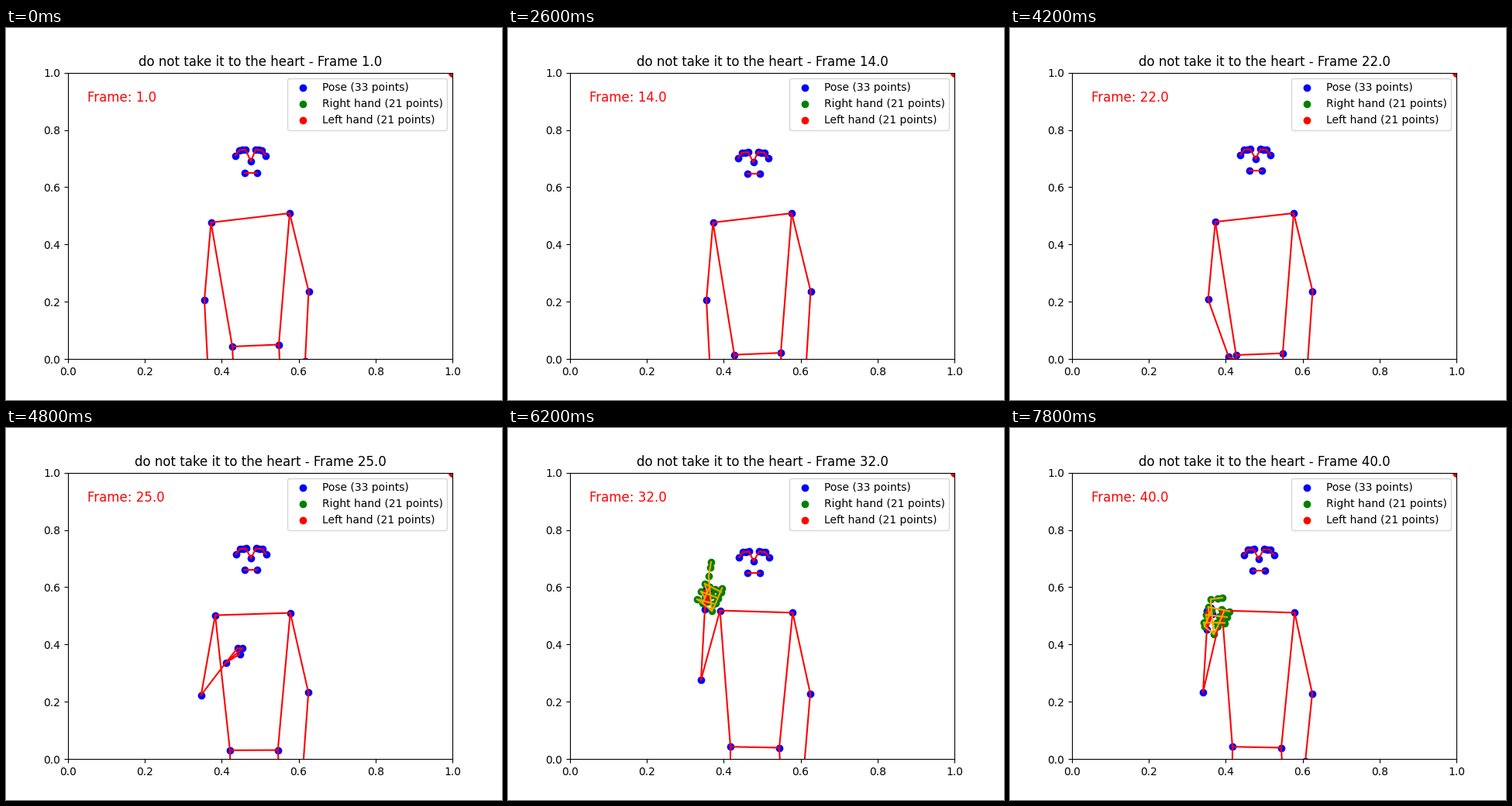
Animation, 640 px wide and 480 px high, one loop 8 s. Source, as a matplotlib script:

```python
import numpy as np
import matplotlib.pyplot as plt
from matplotlib.animation import FuncAnimation
from matplotlib.collections import LineCollection

STEPS, INTERVAL = 40, 200
HAND_START = 27          # step number at which the right hand is detected
TITLE = "do not take it to the heart - Frame {:.1f}"

# Stage pixels, y down: left/right shoulder, left/right elbow, left/right hip
ARMS_DOWN = np.array([(366, 239), (264.5, 251), (390.5, 339.5),
                      (256, 351), (352, 408.5), (292, 411)])
ARM_UP = np.array([(367.3, 238.3), (273.5, 235.5), (390, 342.5),
                   (249, 333), (350, 412.5), (287, 411.3)])

POSE_LINKS = [
    (0, 1), (1, 2), (2, 3), (3, 7), (0, 4), (4, 5), (5, 6), (6, 8), (9, 10),
    (11, 12), (11, 13), (13, 15), (15, 17), (15, 19), (15, 21), (17, 19),
    (12, 14), (14, 16), (16, 18), (16, 20), (16, 22), (18, 20),
    (11, 23), (12, 24), (23, 24), (23, 25), (24, 26)]
HAND_LINKS = [(0, 5), (5, 9), (9, 13), (13, 17), (0, 17), (0, 1)]
HAND_LINKS += [(b + j, b + j + 1) for b in range(1, 18, 4) for j in range(3)]

AWAY = np.ones((21, 2))  # undetected hands collapse into the corner


def ease(t, start, end):
    x = np.clip((t - start) / (end - start), 0, 1)
    return x * x * (3 - 2 * x)


def raised(t):
    return ease(t, 21, 28)


def settle(t):
    """Slow sinking of hips and eyelids from the first step on."""
    return 1 - np.exp((1 - t) / 6)


def to_axes(pts):
    return (np.array(pts) - (80, 427.2)) / (496, -369.6)


def head_points(t):
    nose = np.array([np.interp(t, [1, 22, 28, 32, 40], [316, 317, 315, 317, 320.5]),
                     np.interp(t, [1, 14, 22, 28, 32, 40],
                               [172, 173, 169, 167, 172, 169])])
    mid = nose + (raised(t) - 0.5, 0)
    lid = 15 - 2.5 * settle(t)
    eyes = [mid + (side * (6.5 + 4 * j), 0.4 * j - lid)
            for side in (1, -1) for j in range(3)]
    ears = [mid + (side * 19.5, 7.5 - lid) for side in (1, -1)]
    mouth = [nose + (side * 8, 15) for side in (1, -1)]
    return [nose] + eyes + ears + mouth


def right_wrist(t):
    keys = [1, 16, 22, 24, 26, 28, 32, 40]
    return np.array([
        np.interp(t, keys, [261, 261, 282, 288, 279, 274, 254, 254]),
        np.interp(t, keys, [448, 446, 424, 350, 256, 229, 234, 260])])


def pose_points(t):
    up, sink = raised(t), settle(t)
    joints = ARMS_DOWN + up * (ARM_UP - ARMS_DOWN)
    joints[3, 1] -= 8 * up * np.cos((t - 32) * np.pi / 8)
    joints[4:, 1] += 12 * sink * (1 - up)
    arms, hips = list(joints[:4]), list(joints[4:])

    phase = (t - 1) / (STEPS - 1)
    wl = np.array([386 - 5 * phase, 430 + 12 * np.sin(np.pi * phase)])
    wr = right_wrist(t)
    turn = np.pi * (1 - ease(t, 18, 28))
    c, s = np.cos(turn), np.sin(turn)
    fingers = []
    for x, y in ((0, -24), (5, -28), (7, -20)):   # pinky, index, thumb
        fingers += [wl + (-x, -y), wr + (c * x - s * y, s * x + c * y)]

    knees = [hips[0] + (10, 190), hips[1] + (2 * (hips[1][0] - 287), 190)]
    feet = [k + (0, d) for d in (150, 165, 175) for k in knees]
    return to_axes(head_points(t) + arms + [wl, wr] + fingers
                   + hips + knees + feet)


def hand_points(t):
    """A raised index finger that bends over to join the curled ones."""
    if t < HAND_START:
        return AWAY
    bend = ease(t, 32, 40)
    pts = [(0, 0)] + [(5 + 2.7 * j, -10 - 6.5 * j) for j in range(4)]
    for f in range(4):
        knuckle = np.array([-3 - 3 * f, -31 + 7 * f])
        joint = np.array([-4 - (5 - 2 * bend) * f, -45 + 10 * f])
        if f == 0:
            reach = np.array([3 + 12 * bend, -18 + 16 * bend])
        else:
            reach = np.array([21 + 6 * bend, 13 - 2.5 * f - 5 * bend])
        pts += [knuckle, joint, joint + 0.62 * reach, joint + reach]
    wrist = right_wrist(t) + (3 + 6 * ease(t, 28, 32), 8 - 6 * ease(t, 28, 32))
    return to_axes(wrist + np.array(pts) + (0, 4 * bend))


fig, ax = plt.subplots(figsize=(6.4, 4.8), dpi=100)
ax.set(xlim=(0, 1), ylim=(0, 1))


def dots(color, label):
    return ax.scatter([1], [1], c=color, label=label)


def bones(color):
    lines = LineCollection([], colors=color, linewidths=1.5, zorder=2,
                           capstyle="projecting")
    return ax.add_collection(lines, autolim=False)


pose_dots = dots("blue", "Pose (33 points)")
right_dots = dots("green", "Right hand (21 points)")
left_dots = dots("red", "Left hand (21 points)")
left_dots.set_offsets(AWAY)
pose_bones = bones("red")
right_bones = bones("orange")
title = ax.set_title("")
counter = ax.text(0.05, 0.9, "", fontsize=12, color="red")
ax.legend(loc="upper right")


def draw(i):
    t = i + 1
    pose, hand = pose_points(t), hand_points(t)
    pose_dots.set_offsets(pose)
    pose_bones.set_segments([pose[list(k)] for k in POSE_LINKS])
    right_dots.set_offsets(hand)
    links = HAND_LINKS if t >= HAND_START else []
    right_bones.set_segments([hand[list(k)] for k in links])
    title.set_text(TITLE.format(t))
    counter.set_text(f"Frame: {t:.1f}")
    return pose_dots, right_dots, pose_bones, right_bones, title, counter


anim = FuncAnimation(fig, draw, frames=STEPS, interval=INTERVAL,
                     repeat=True, repeat_delay=0, blit=False)
plt.show()
```
